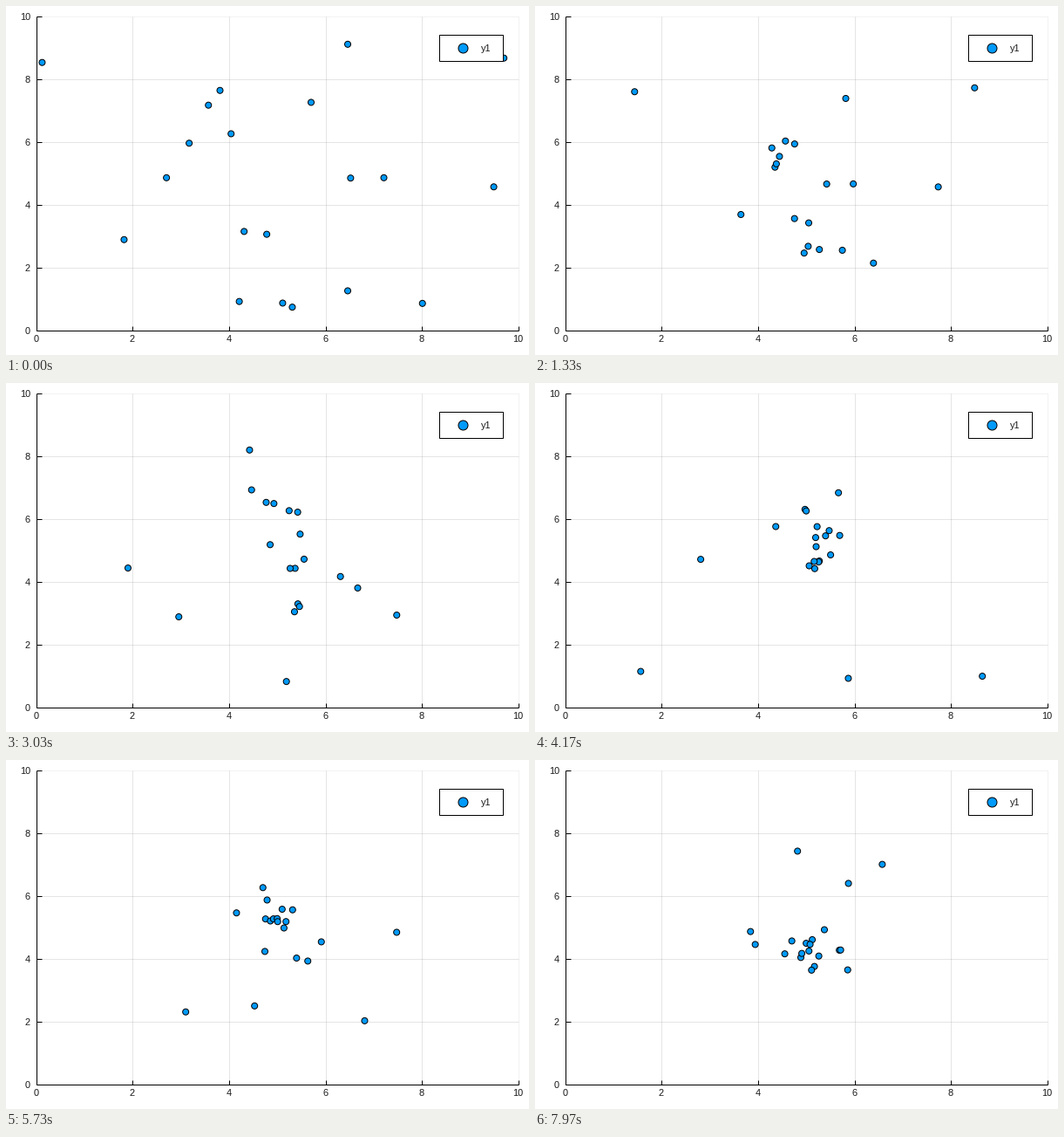
A matplotlib script for the animation above (8000 ms loop, 600 by 400 pixels).

```python
import numpy as np
import matplotlib.pyplot as plt
from matplotlib.animation import FuncAnimation
from matplotlib.patches import Rectangle

W, H, DPI = 600, 400, 100
LOOP, STEP = 8000, 20
PX = 72 / DPI                      # one pixel in points
BLUE = "#009afa"
LEFT, RIGHT, TOP, BOTTOM = 35, 588, 12, 372

# Dots start at rest and attract each other with a 1/r force and slight drag
PULL, DRAG, SOFT = 0.654, 0.13, 0.15
SUBSTEPS = 8
START = [(0.12, 8.53), (6.46, 9.11), (9.70, 8.67), (3.81, 7.64), (3.57, 7.17),
         (5.70, 7.26), (4.04, 6.26), (3.17, 5.96), (2.70, 4.86), (6.52, 4.85),
         (7.21, 4.86), (9.49, 4.57), (1.82, 2.89), (4.31, 3.15), (4.78, 3.06),
         (4.21, 0.92), (5.11, 0.87), (5.31, 0.74), (6.46, 1.26), (8.01, 0.86)]


def pull(pos):
    gap = pos[None, :, :] - pos[:, None, :]
    dist2 = (gap ** 2).sum(axis=2, keepdims=True) + SOFT ** 2
    return PULL * (gap / dist2).sum(axis=1)


def simulate(ticks):
    """Dot positions halfway through every tick, by leapfrog steps."""
    dt = STEP / 1000 / SUBSTEPS
    pos = np.array(START)
    vel = np.zeros_like(pos)
    path = []
    for _ in range(ticks):
        for k in range(SUBSTEPS):
            if k == SUBSTEPS // 2:
                path.append(pos.copy())
            pos += vel * dt / 2
            vel = (vel + pull(pos) * dt) * (1 - DRAG * dt)
            pos += vel * dt / 2
    return path


def to_px(xy):
    x, y = np.asarray(xy, float).T
    return np.column_stack([LEFT + (RIGHT - LEFT) * x / 10,
                            BOTTOM - (BOTTOM - TOP) * y / 10])


path = simulate(LOOP // STEP)

plt.rcParams["font.family"] = "Liberation Sans"
fig = plt.figure(figsize=(W / DPI, H / DPI), dpi=DPI, facecolor="white")
ax = fig.add_axes([0, 0, 1, 1])
# the small offset makes whole-pixel lines snap the same way everywhere
ax.set_xlim(0.2, W + 0.2)
ax.set_ylim(H + 0.2, 0.2)
ax.axis("off")


def line(xs, ys, alpha=1.0, z=2):
    ax.plot(xs, ys, color="black", alpha=alpha, lw=PX, zorder=z,
            solid_capstyle="butt")


def label(x, y, text, ha, z=2):
    ax.text(x, y, text, ha=ha, va="center_baseline", fontsize=11 * PX,
            color="#1a1a1a", zorder=z)


def dots(xy, size, z):
    # one size per dot keeps positions unrounded
    return ax.scatter(xy[:, 0], xy[:, 1], s=[(size * PX) ** 2] * len(xy),
                      c=BLUE, edgecolors="black", linewidths=PX, zorder=z)


for v in range(0, 11, 2):
    x, y = to_px([(v, v)])[0]
    if v:
        faint = 0.05 if v == 10 else 0.1
        line([x, x], [TOP, BOTTOM], faint, 1)
        line([LEFT, RIGHT], [y, y], faint, 1)
    line([x, x], [BOTTOM, BOTTOM - 5])
    line([LEFT, LEFT + 6], [y, y])
    label(x - 0.5, 381, str(v), "center")
    label(28.2, y, str(v), "right")
line([LEFT, LEFT], [TOP, BOTTOM])
line([LEFT, RIGHT], [BOTTOM, BOTTOM])

swarm = dots(to_px(START), 7, 3)

ax.add_patch(Rectangle((497, 33), 73, 30, facecolor="white",
                       edgecolor="black", lw=PX, zorder=4))
dots(np.array([[524.2, 48]]), 11, 5)
label(545, 48, "y1", "left", 5)


def update(i):
    swarm.set_offsets(to_px(path[i]))
    return [swarm]


anim = FuncAnimation(fig, update, frames=LOOP // STEP, interval=STEP,
                     repeat=True, repeat_delay=0, blit=False)
plt.show()
```
